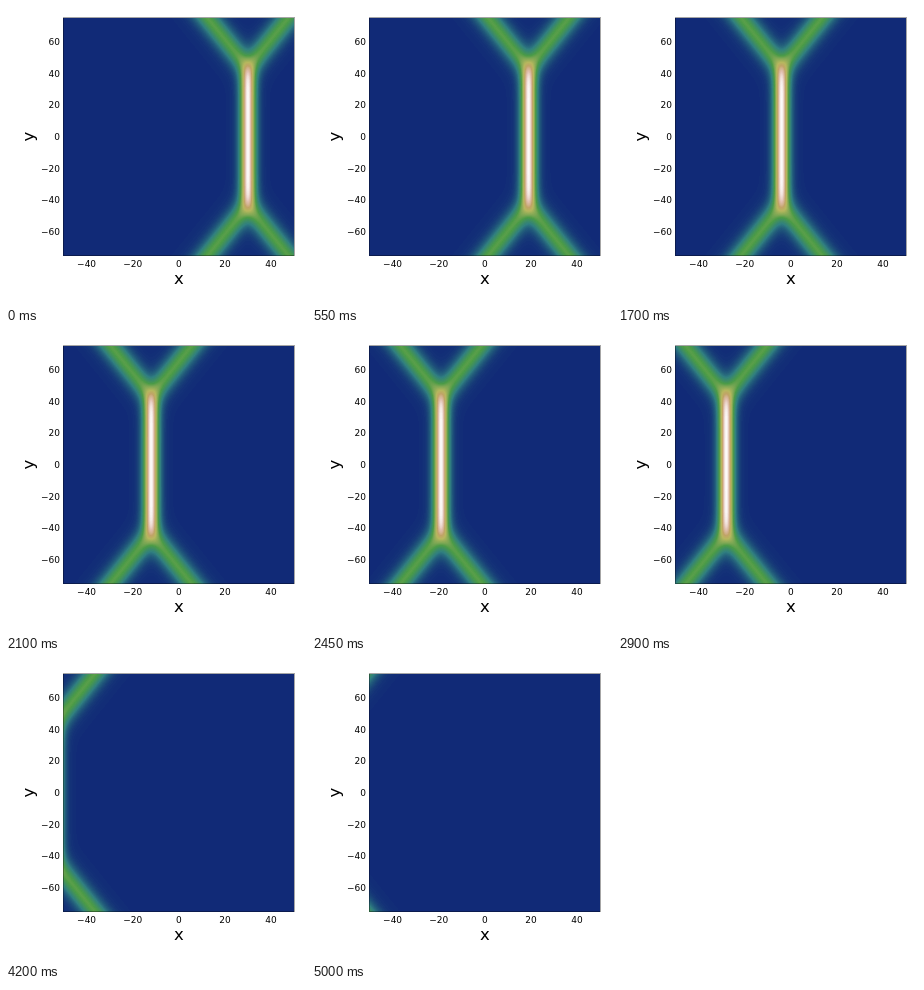
Write an HTML page with a canvas that moves like this. It is 300x300 px and loops after 5050 ms.

```html
<!DOCTYPE html>
<html lang="en">
<head>
<meta charset="utf-8">
<title>Soliton heatmap</title>
<style>
  html, body { margin: 0; width: 100%; height: 100%; overflow: hidden; background: #fff; }
  canvas { display: block; width: 300px; height: 300px; }
</style>
</head>
<body>
<canvas id="stage" width="300" height="300"></canvas>
<script>
const ctx = document.getElementById('stage').getContext('2d', { willReadFrequently: true });
const plot = { x: 57, y: 12, w: 231, h: 238 };
const mid = { x: 172.8, y: 130.7 };
const scale = { x: 2.305, y: 1.583 };
const STEP_MS = 50, STEPS = 101;

// Navy, teal, green, sand and white, blended evenly between stops
function makePalette() {
  const gradient = ctx.createLinearGradient(0, 0, 256, 0);
  const stops = {
    0: '#112a77', 0.07: '#1c4d79', 0.2: '#307f80', 0.41: '#4b9b46', 0.5: '#79a653',
    0.66: '#b7b75e', 0.77: '#c1a367', 0.89: '#e0beae', 1: '#fdfbfb'
  };
  for (const [at, color] of Object.entries(stops)) gradient.addColorStop(+at, color);
  ctx.fillStyle = gradient;
  ctx.fillRect(0, 0, 256, 1);
  return ctx.getImageData(0, 0, 256, 1).data;
}
const palette = makePalette();

// Two oblique waves joined by a vertical stem: u = (1 + c w) / (w + c)^2
const K = 0.45, SLOPE = 0.555, STEM = 43.5, SATURATION = 1.3;
const image = ctx.createImageData(plot.w, plot.h);

function samples(count, fn) {
  return Array.from({ length: count }, (_, i) => fn(i + 0.5));
}
const couplings = samples(plot.h, j => {
  const y = (mid.y - plot.y - j) / scale.y;
  return Math.cosh(K * SLOPE * y) * Math.exp(-K * SLOPE * STEM);
});

function drawField(center) {
  const waves = samples(plot.w, i =>
    Math.cosh(K * ((plot.x + i - mid.x) / scale.x - center)));
  let o = 0;
  for (const c of couplings) {
    for (const w of waves) {
      const u = (1 + c * w) / (w + c) ** 2;
      const height = u * (1 + SATURATION) / (1 + SATURATION * u);
      const p = 4 * Math.round(255 * height);
      for (let k = 0; k < 4; k++) image.data[o++] = palette[p + k];
    }
  }
  ctx.putImageData(image, plot.x, plot.y);
}

function drawAxes() {
  ctx.fillStyle = '#fff';
  ctx.fillRect(0, 0, 300, 300);
  ctx.fillStyle = '#000';
  ctx.font = '9px "DejaVu Sans", sans-serif';
  const label = n => String(n).replace('-', '\u2212');
  ctx.textAlign = 'center';
  for (let x = -40; x <= 40; x += 20) ctx.fillText(label(x), mid.x + x * scale.x, 260.5);
  ctx.textAlign = 'right';
  for (let y = -60; y <= 60; y += 20) ctx.fillText(label(y), 54, mid.y - y * scale.y + 3.3);

  ctx.font = '16.5px "DejaVu Sans", sans-serif';
  ctx.textAlign = 'center';
  ctx.fillText('x', mid.x, 278);
  ctx.save();
  ctx.translate(28, mid.y);
  ctx.rotate(-Math.PI / 2);
  ctx.fillText('y', 0, 0);
  ctx.restore();
}

function drawFrame() {
  ctx.strokeStyle = 'rgba(0, 0, 0, .35)';
  ctx.lineWidth = 1;
  ctx.strokeRect(57.5, 11.5, 231, 238);
}

let shown = -1;
function tick() {
  const step = Math.floor(performance.now() / STEP_MS) % STEPS;
  if (step !== shown) {
    shown = step;
    drawAxes();
    drawField(30 - step);
    drawFrame();
  }
  requestAnimationFrame(tick);
}
tick();
</script>
</body>
</html>
```
